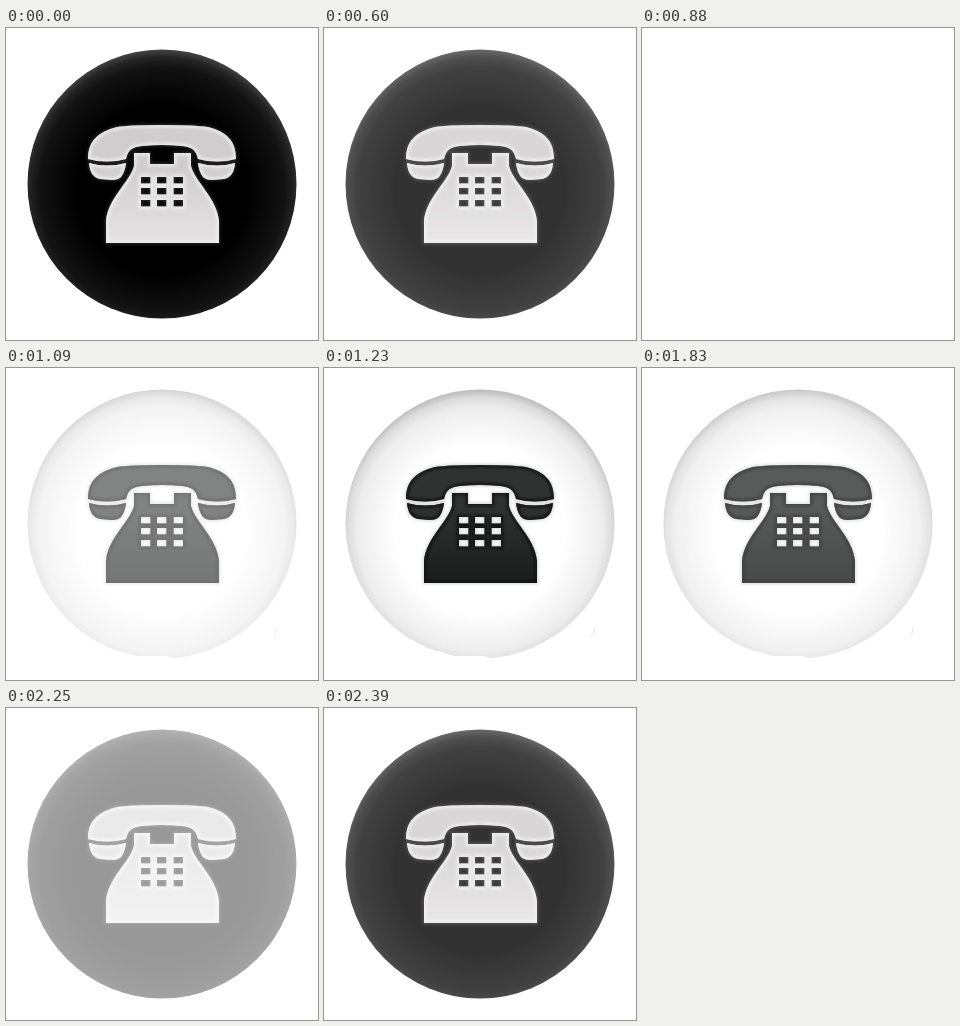
An HTML page that plays this animation: 312x312 px, repeating every 2460 ms.

```html
<!DOCTYPE html>
<html lang="en">
<head>
<meta charset="utf-8">
<title>Telephone button</title>
<style>
html, body { margin: 0; height: 100%; overflow: hidden; background: #fff; }
svg { display: block; width: 100vw; height: 100vh; }
.dark { filter: invert(1); }
</style>
</head>
<body>
<svg viewBox="0 0 312 312">
  <defs>
    <radialGradient id="shade" gradientUnits="userSpaceOnUse" cx="156" cy="162" r="141">
      <stop offset=".6" stop-color="#fff"/>
      <stop offset=".77" stop-color="#f4f4f4"/>
      <stop offset=".87" stop-color="#ededed"/>
      <stop offset=".94" stop-color="#dcdcdc"/>
      <stop offset="1" stop-color="#b8b8b8"/>
    </radialGradient>
    <linearGradient id="ink" gradientUnits="userSpaceOnUse" x1="0" y1="97" x2="0" y2="215">
      <stop offset="0" stop-color="#303231"/>
      <stop offset=".35" stop-color="#303231"/>
      <stop offset="1" stop-color="#1b1d1c"/>
    </linearGradient>
    <filter id="blur"><feGaussianBlur stdDeviation="1.4"/></filter>
    <path id="shape" clip-rule="evenodd" fill-rule="evenodd"/>
    <clipPath id="inside"><use href="#shape" clip-rule="evenodd"/></clipPath>
    <clipPath id="trim">
      <path d="M0 0H312V205H286L281 216 273 231 264 243 252 254 236 265 222 273 215 282 196 286 174 292 160 288 130 288 114 283 90 286 78 276 62 267 46 256 30 240 0 220Z"/>
    </clipPath>
    <g id="phone">
      <use href="#shape" fill="none" stroke="#888" stroke-width="2" opacity=".45" filter="url(#blur)"/>
      <use href="#shape" fill="url(#ink)"/>
      <g clip-path="url(#inside)">
        <use href="#shape" fill="none" stroke="#080808" stroke-width="4" opacity=".8" filter="url(#blur)"/>
      </g>
    </g>
  </defs>
  <g id="black" class="dark">
    <circle cx="156" cy="156" r="134.5" fill="url(#shade)"/>
    <use href="#phone"/>
  </g>
  <g id="white">
    <circle cx="156" cy="156" r="134.5" fill="url(#shade)" clip-path="url(#trim)"/>
    <path d="M271 260L270 265 267 268" fill="none" stroke="#e2e2e2"/>
    <use href="#phone"/>
  </g>
</svg>
<script>
const $ = id => document.getElementById(id);
const HOLD = 600, STEP = 70, HALF = 1230;

const handset = "M82 131C82 113 92 104 111 99Q124 97 156 97Q188 97 202 99C221 104 230 113 230 131Q211 136 192 131C190 122 186 119 176 118Q156 116 136 118C126 119 122 122 120 131Q101 136 82 131Z";
const ends = "M83 135Q101 140 120 135Q119 144 115 149Q112 152 106 152L94 151Q84 149 83 135Z" +
  "M229 135Q211 140 192 135Q193 144 197 149Q200 152 206 152L218 151Q228 149 229 135Z";
const base = "M128 125H144V136H168V125H185V138C189 154 211 170 213 193V215H100V193C102 170 124 154 128 138Z";
let keys = "";
for (const y of [149, 160, 172])
  for (const x of [135, 151, 167.5]) keys += `M${x} ${y}h9.5v6.5h-9.5z`;
$("shape").setAttribute("d", handset + ends + base + keys);

// Each half: hold, four steps down to blank, then four steps up to the other button.
function draw(now) {
  const t = now % (2 * HALF), local = t % HALF;
  const step = local < HOLD ? 0 : Math.floor((local - HOLD) / STEP) + 1;
  const alpha = Math.abs(5 - step) / 5;
  const black = (t < HALF) === (step < 5);
  $("black").setAttribute("opacity", black ? alpha : 0);
  $("white").setAttribute("opacity", black ? 0 : alpha);
}

const start = performance.now();
function loop() {
  draw(performance.now() - start);
  requestAnimationFrame(loop);
}
loop();
</script>
</body>
</html>
```
